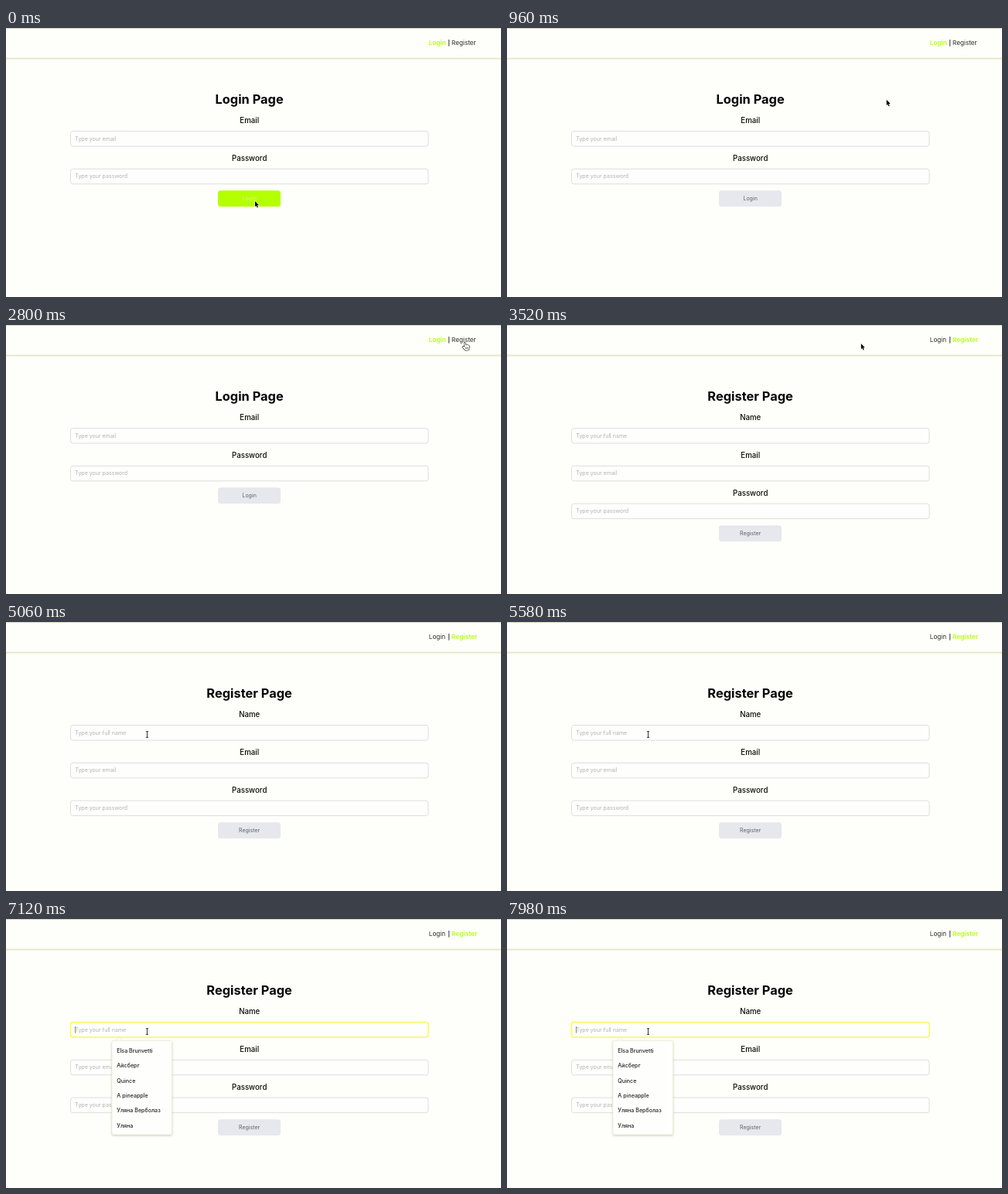
An HTML page with a canvas that plays this animation: 640x348 px, repeating every 8 s.

```html
<!DOCTYPE html>
<html lang="en">
<head>
<meta charset="utf-8">
<title>Login and register forms</title>
<style>
html, body { margin: 0; width: 100%; height: 100%; overflow: hidden; background: #fefefa; }
canvas { display: block; width: 640px; height: 348px; }
</style>
</head>
<body>
<canvas id="stage"></canvas>
<script>
const W = 640, H = 348, LOOP = 8000;
const REGISTER_AT = 2900, FOCUS_AT = 5860;
const BG = '#fefefa', LIME = '#bcff2c';
const canvas = document.getElementById('stage');
const ctx = canvas.getContext('2d');
const ratio = window.devicePixelRatio || 1;
canvas.width = W * ratio;
canvas.height = H * ratio;

// Pointer positions: time, x, y
const track = [
  [0, 322, 224], [40, 322, 224], [400, 372, 186], [960, 490.5, 93],
  [1300, 565, 48], [1560, 597, 30], [1940, 597, 30], [2520, 594, 23],
  [2960, 594, 23], [3520, 458, 24], [3620, 454, 26], [4100, 318, 86],
  [4500, 212, 133], [4900, 182.5, 145.5], [LOOP, 182.5, 145.5]
];

const suggestions = ['Elsa Brunvetti', 'Айсберг', 'Quince', 'A pineapple', 'Уляна Верболаз', 'Уляна'];

const clamp = v => Math.max(0, Math.min(1, v));

function slope(i, axis) {
  const a = track[i - 1], b = track[i], c = track[i + 1];
  if (!a || !c) return 0;
  const before = b[axis] - a[axis], after = c[axis] - b[axis];
  return before * after <= 0 ? 0 : (before + after) / (c[0] - a[0]);
}

function pointerAt(t) {
  let i = 0;
  while (i < track.length - 2 && t >= track[i + 1][0]) i++;
  const a = track[i], b = track[i + 1], span = b[0] - a[0];
  const u = clamp((t - a[0]) / span), u2 = u * u, u3 = u2 * u;
  const [x, y] = [1, 2].map(k =>
    (2 * u3 - 3 * u2 + 1) * a[k] + (u3 - 2 * u2 + u) * span * slope(i, k) +
    (3 * u2 - 2 * u3) * b[k] + (u3 - u2) * span * slope(i + 1, k));
  return { x, y };
}

function mix(from, to, u) {
  return `rgb(${from.map((v, i) => Math.round(v + (to[i] - v) * u))})`;
}

function text(str, x, y, size, color, weight = 400, align = 'left') {
  ctx.font = `${weight} ${size}px Inter, "Open Sans", sans-serif`;
  ctx.textAlign = align;
  ctx.fillStyle = color;
  ctx.fillText(str, x, y);
}

function box(x, y, w, h, r) {
  ctx.beginPath();
  ctx.roundRect(x, y, w, h, r);
}

function header(registering) {
  ctx.fillStyle = '#d6d6c4';
  ctx.fillRect(0, 0, W, 1);
  ctx.fillStyle = '#f6f6e4';
  ctx.fillRect(0, 38, W, 3);
  ctx.fillStyle = '#e4e4cc';
  ctx.fillRect(0, 39, W, 1);
  const link = (label, x, active) =>
    text(label, x, 22.4, 8.2, active ? LIME : '#2c2c28', active ? 700 : 400);
  link('Login', 546.8, !registering);
  text('|', 571.4, 22, 7.2, '#111', 600);
  link('Register', 576, registering);
}

function field(label, hint, y, focused) {
  text(label, 314.7, y - 10, 9.7, '#0c0c0a', 500, 'center');
  box(83.5, y + 0.5, 462.5, 19.5, 3);
  ctx.fillStyle = '#fefefc';
  ctx.fill();
  ctx.strokeStyle = focused ? '#fafa50' : '#dedee0';
  ctx.lineWidth = focused ? 1.5 : 1;
  ctx.stroke();
  text(hint, 89.3, y + 12.6, 7.05, '#b2b2b4');
}

function button(label, y, hover) {
  box(274, y, 81, 20.7, 3.5);
  ctx.fillStyle = mix([231, 231, 238], [180, 255, 0], hover);
  ctx.fill();
  text(label, 314.6, y + 13, 7.05, mix([98, 98, 104], [222, 255, 130], hover), 400, 'center');
}

function dropdown() {
  ctx.save();
  ctx.shadowColor = 'rgba(130,130,100,.5)';
  ctx.shadowBlur = 3 * ratio;
  ctx.shadowOffsetY = ratio;
  ctx.fillStyle = '#fefefc';
  box(137, 157.5, 77.5, 121.5, 2);
  ctx.moveTo(143, 157.6);
  ctx.lineTo(146.5, 154.5);
  ctx.lineTo(150, 157.6);
  ctx.fill();
  ctx.restore();
  box(137, 157.5, 77.5, 121.5, 2);
  ctx.strokeStyle = '#ececd8';
  ctx.lineWidth = 0.7;
  ctx.stroke();
  suggestions.forEach((s, i) => text(s, 143.3, 173 + i * 19.35, 7.1, '#222220', 500));
}

function shape(points, fill, stroke, width) {
  ctx.beginPath();
  points.forEach(([x, y]) => ctx.lineTo(x, y));
  ctx.closePath();
  ctx.lineJoin = 'round';
  ctx.lineWidth = width;
  ctx.strokeStyle = stroke;
  ctx.fillStyle = fill;
  ctx.stroke();
  ctx.fill();
}

const cursors = {
  arrow() {
    shape([[0, 0], [0, 7.2], [1.6, 5.8], [2.7, 8.4], [3.9, 7.9], [2.8, 5.3], [5, 5.2]], '#000', '#fff', 1.2);
  },
  hand() {
    shape([[-1.6, 0.2], [-0.4, 0], [0.6, 3], [2, 2.5], [3.2, 3.1], [4.6, 3.5], [5.2, 6.4],
      [4.2, 9.4], [0.2, 9.8], [-2, 7.8], [-3.8, 5.2], [-2.8, 4.5], [-1, 5.4]], '#fefefc', '#222', 1.3);
    ctx.lineWidth = 0.6;
    ctx.beginPath();
    for (const x of [0.4, 1.9, 3.3]) {
      ctx.moveTo(x, 5.6);
      ctx.lineTo(x, 8);
    }
    ctx.stroke();
  },
  beam() {
    ctx.strokeStyle = '#222';
    ctx.lineWidth = 0.9;
    ctx.beginPath();
    ctx.moveTo(-1.6, -3.8);
    ctx.lineTo(1.6, -3.8);
    ctx.moveTo(0, -3.8);
    ctx.lineTo(0, 3.8);
    ctx.moveTo(-1.6, 3.8);
    ctx.lineTo(1.6, 3.8);
    ctx.stroke();
  }
};

function pointer(t, tops) {
  const { x, y } = pointerAt(t);
  const inField = x > 83 && x < 546 && tops.some(top => y >= top && y <= top + 20);
  const onLink = x > 546 && x < 609 && y > 13 && y < 25.5;
  ctx.save();
  ctx.translate(x, y);
  cursors[inField ? 'beam' : onLink ? 'hand' : 'arrow']();
  ctx.restore();
}

function draw(t) {
  const registering = t >= REGISTER_AT, focused = t >= FOCUS_AT;
  ctx.setTransform(ratio, 0, 0, ratio, 0, 0);
  ctx.fillStyle = BG;
  ctx.fillRect(0, 0, W, H);
  header(registering);

  const fields = [['Email', 'Type your email'], ['Password', 'Type your password']];
  if (registering) fields.unshift(['Name', 'Type your full name']);
  const tops = fields.map((f, i) => 133 + i * 48.8);
  const title = registering ? 'Register Page' : 'Login Page';
  text(title, 314.6, 97.8, 16.4, '#050504', 700, 'center');
  fields.forEach(([label, hint], i) => field(label, hint, tops[i], focused && i === 0));
  const hover = registering ? 0 : 1 - clamp((t - 150) / 250);
  button(registering ? 'Register' : 'Login', registering ? 259.2 : 210.3, hover);

  if (focused) {
    if ((t - FOCUS_AT) % 1000 < 500) {
      ctx.fillStyle = '#66665c';
      ctx.fillRect(89, 139, 0.8, 8.5);
    }
    dropdown();
  }
  pointer(t, tops);
}

const start = performance.now();
function tick() {
  draw((performance.now() - start) % LOOP);
  requestAnimationFrame(tick);
}
tick();
</script>
</body>
</html>
```
